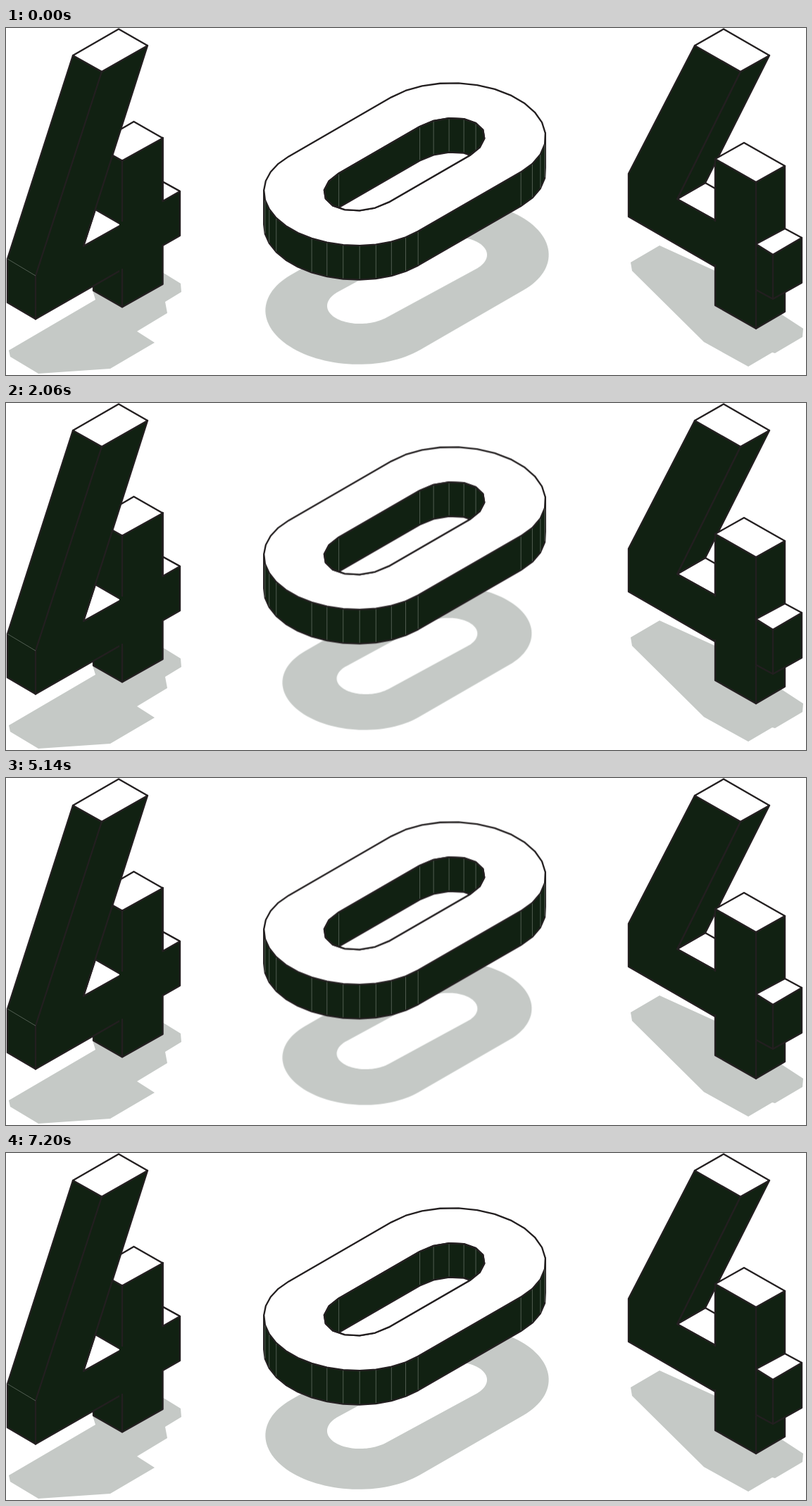
An HTML page for the animation above (7.22 s loop, 1136 by 493 pixels).

```html
<!DOCTYPE html>
<html lang="en">
<head>
<meta charset="utf-8">
<title>404</title>
<style>
  html, body { margin: 0; width: 100%; height: 100%; overflow: hidden; background: #fff; }
  svg { display: block; width: 100vw; height: 100vh; }
  .shadow { fill: #c5c9c6; fill-rule: evenodd; }
  .dark, .white, .edge { stroke: #231f20; stroke-width: 2.3; stroke-linejoin: round; stroke-linecap: round; }
  .dark { fill: #112112; }
  .white { fill: #fff; fill-rule: evenodd; }
  .edge { fill: none; }
  .seam { fill: none; stroke: #7c867d; stroke-width: .6; }
</style>
</head>
<body>
<svg viewBox="0 0 1136 493">
  <defs><clipPath id="hole"><path id="holeClip"/></clipPath></defs>

  <g id="leftFour">
    <path class="shadow" d="M4 458 127 386 123 373 165 350 222 347 248 363 249 375 226 389 229 405 186 431 211 447 148 484 46 491 6 467Z"/>
    <path class="dark" d="M124 340V373L165 396.5 222.6 364V309L247 295V232L222.6 218.5V156L165 188.5 125 166V340Z"/>
    <path class="white" d="M222.6 218.5 247 232 222.6 246Z"/>
    <path class="white" d="M125 166 181.5 133 222.6 156.5 165 188.5Z"/>
    <path class="edge" d="M165 188V279M222.6 156V246M165 343V396"/>
    <path class="white" d="M127 258 165 280 110 310Z"/>
    <path class="dark" d="M95 39 2 328V390L42 413.5 165 343V279L110 310 201 25 136 62Z"/>
    <path d="M161 275H170V348H161Z" fill="#112112"/>
    <path class="white" d="M95 39 160 1.5 201 25 136 62Z"/>
    <path class="edge" d="M136 62 42 352V413.5M165 343V396"/>
    <path class="seam" d="M2 328 42 352"/>
  </g>

  <g id="rightFour">
    <path class="shadow" d="M887 333 928 309 1007 345 1106 410 1132 427 1131 439 1092 462 1088 461 1054 481 991 446 889 345Z"/>
    <path class="white" d="M953 243 993 220 1007 228V273Z"/>
    <path class="dark" d="M1043 62 1084 39 993 220 953 243Z"/>
    <path class="dark" d="M978 25 884 207V268L1007 339V273L953 243 1043 62Z"/>
    <path class="white" d="M978 25 1019 1.5 1084 39 1043 62Z"/>
    <path class="dark" d="M1007 186 1065 219 1106 196V403L1065 427 1007 394Z"/>
    <path d="M1003 275H1011V336H1003Z" fill="#112112"/>
    <path class="white" d="M1007 186 1048 163 1106 196 1065 219Z"/>
    <path class="edge" d="M1065 219V427"/>
    <path class="dark" d="M1065 307 1089 322 1130 298V362L1089 385 1065 372Z"/>
    <path class="white" d="M1065 307 1106 285 1130 298 1089 322Z"/>
    <path class="edge" d="M1089 322V385"/>
  </g>

  <path id="zeroShadow" class="shadow"/>
  <g id="zero">
    <path id="wall" class="dark"/>
    <path id="face" class="white"/>
    <g clip-path="url(#hole)">
      <path id="inside" class="dark"/>
      <path id="insideSeams" class="seam"/>
      <path id="through" class="white"/>
    </g>
    <path id="rim" class="edge"/>
    <path id="wallSeams" class="seam"/>
  </g>
</svg>
<script>
const LOOP = 7220, PEAK = 3600, END = 7200;
const DEPTH = 48.5;
const SLOPE = Math.tan(Math.PI / 6);
const byId = id => document.getElementById(id);
const setPath = (id, d) => byId(id).setAttribute('d', d);
const toPath = points => 'M' + points.map(p => p.map(n => n.toFixed(2)).join(' ')).join('L');
const drop = points => points.map(([x, y]) => [x, y + DEPTH]);
const seams = points => points.map(([x, y]) => `M${x.toFixed(2)} ${(y + 1).toFixed(2)}v${DEPTH - 2}`).join('');

// Half of an isometric rounded end; a and b are horizontal reaches along both axes.
function arc(cx, cy, a, b, from, to, steps) {
  return Array.from({ length: steps + 1 }, (_, i) => {
    const t = (from + (to - from) * i / steps) * Math.PI / 180;
    const u = a * Math.cos(t), v = b * Math.sin(t);
    return [cx + u + v, cy + (v - u) * SLOPE];
  });
}

// Left end runs from lower right to upper left, right end runs back round.
function ring({ x, y, half, a, b, left, right, squash = 1 }) {
  const dy = half * SLOPE;
  const ends = [
    arc(x - half, y + dy, a, b, 90, 270, left),
    arc(x + half, y - dy, a, b, 270, 450, right)
  ];
  return ends.map(end => end.map(([px, py]) => [px, y + (py - y) * squash]));
}

const [outerLeft, outerRight] = ring({ x: 566.2, y: 193.6, half: 73, a: 87.6, b: 92, left: 17, right: 15 });
const [innerLeft, innerRight] = ring({ x: 565.6, y: 193.7, half: 57.5, a: 44, b: 35.5, left: 8, right: 8 });
const outer = [...outerLeft, ...outerRight];
const inner = [...innerLeft, ...innerRight];
const outerPath = toPath(outer) + 'Z', innerPath = toPath(inner) + 'Z';

const extreme = (points, sign) => points.reduce((best, p, i) => sign * p[0] > sign * points[best][0] ? i : best, 0);
const front = [
  ...outerRight.slice(extreme(outerRight, 1)),
  ...outerLeft.slice(0, extreme(outerLeft, -1) + 1)
];

setPath('wall', toPath([...front, ...drop(front).reverse()]) + 'Z');
setPath('wallSeams', seams(front.slice(1, -1).filter(([x]) => x < 393 || x > 425)));
setPath('face', outerPath + innerPath);
setPath('holeClip', innerPath);
setPath('inside', innerPath);
setPath('insideSeams', seams([innerLeft[8], ...innerRight.slice(0, 5)]));
setPath('through', toPath(drop(inner)) + 'Z');
setPath('rim', innerPath);

const shade = options => ring({ x: 569.5, left: 60, right: 60, ...options }).flat();
setPath('zeroShadow',
  toPath(shade({ y: 361.7, half: 73.5, a: 88.5, b: 92 })) + 'Z' +
  toPath(shade({ y: 358.5, half: 64, a: 36, b: 34, squash: .94 })) + 'Z');

function sway(id, rest, peak) {
  byId(id).animate([
    { offset: 0, transform: rest },
    { offset: PEAK / LOOP, transform: peak },
    { offset: END / LOOP, transform: rest },
    { offset: 1, transform: rest }
  ], { duration: LOOP, iterations: Infinity });
}

byId('zeroShadow').style.transformOrigin = '569.5px 367px';
sway('zero', 'translateY(0px)', 'translateY(-27.4px)');
sway('zeroShadow', 'scale(1)', 'scale(.79)');
</script>
</body>
</html>
```
